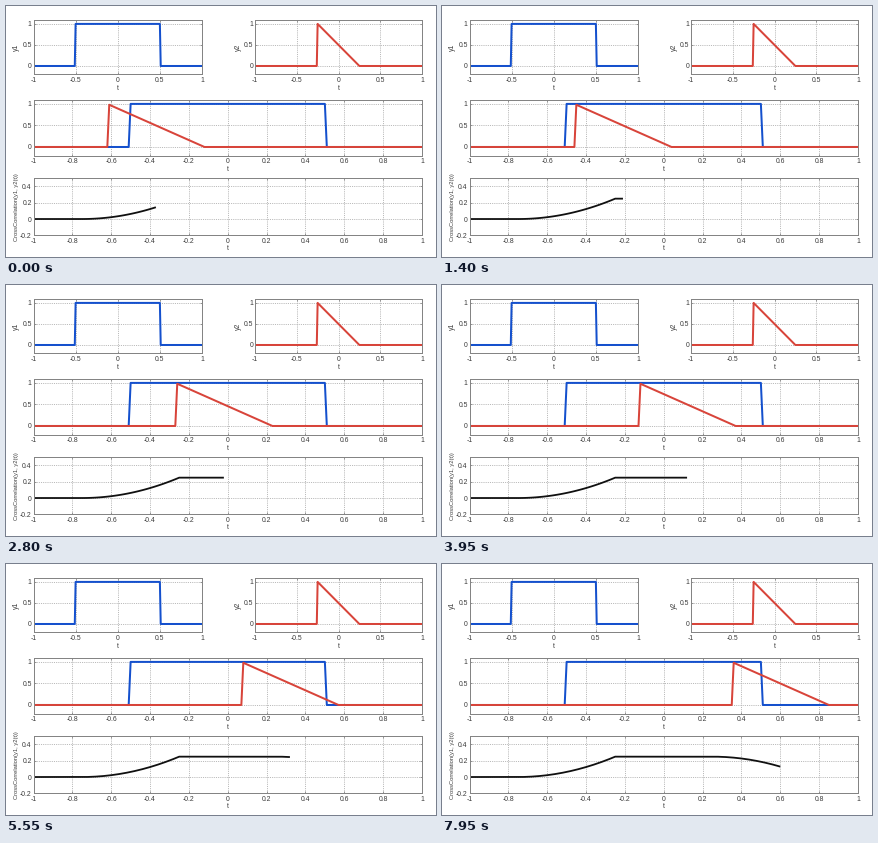
Write a matplotlib script that moves like this. It is 430 px wide and 251 px high and loops after 8 s.

```python
import numpy as np
import matplotlib.pyplot as plt
from matplotlib.animation import FuncAnimation

W, H, DPI = 430, 251, 128
PX = 72 / DPI  # points per pixel
BLUE, RED, BLACK = "#1450cd", "#d8443a", "#101010"
FRAME, GRID, TEXT = "#848484", "#b4b4b4", "#3c3c3c"
FRAMES, INTERVAL = 160, 50

plt.rcParams["font.family"] = "Liberation Sans"
fig = plt.figure(figsize=(W / DPI, H / DPI), dpi=DPI, facecolor="white")


def label(x, y, s, size=6.9, **kw):
    kw = {"ha": "center", "va": "center", **kw}
    fig.text(x / W, 1 - y / H, s, color=TEXT, fontsize=size * PX, **kw)


def panel(box, ylim, xticks, yticks, name="", size=6.9):
    """Axes with a pixel box (left, top, right, bottom), grid and labels."""
    left, top, right, bottom = box
    ax = fig.add_axes([left / W, 1 - bottom / H,
                       (right - left) / W, (bottom - top) / H])
    ax.set(xlim=(-1, 1), ylim=ylim, xticks=xticks, yticks=yticks)
    ax.set_axisbelow(True)
    ax.tick_params(direction="in", top=True, right=True, length=2 * PX,
                   width=0.8 * PX, color=FRAME,
                   labelbottom=False, labelleft=False)
    ax.grid(color=GRID, lw=0.9 * PX, ls=(0, (1.2, 1.2)))
    for spine in ax.spines.values():
        spine.set(color=FRAME, linewidth=PX)
    for v in xticks:
        label(left + (v + 1) / 2 * (right - left), bottom + 5.8, f"{v:g}")
    for v in yticks:
        y = bottom - (v - ylim[0]) / (ylim[1] - ylim[0]) * (bottom - top)
        label(left - 1.8, y, f"{v:g}", ha="right", va="center_baseline")
    label((left + right) / 2, bottom + 13.7, "t")
    if name:
        label(left - 17, (top + bottom) / 2, name, size, rotation=90)
    return ax


def draw(ax, x, y, color, width=2.0):
    return ax.plot(x, y, color=color, lw=width * PX,
                   solid_joinstyle="round", solid_capstyle="butt")[0]


def pulse(k):
    return (np.abs(k) <= 50).astype(float)


def ramp(k, first=-25):
    return np.where((k >= first) & (k <= 25), (25 - k) / 50, 0.0)


def overlap(t):
    """Area of the shifted ramp lying inside the pulse."""
    def part(u):
        u = np.clip(u, 0, 0.5)
        return u - u * u
    start = t - 0.25
    return part(0.5 - start) - part(-0.5 - start)


k = np.arange(-100, 101)
t = k / 100
coarse = [-1, -0.5, 0, 0.5, 1]
fine = [round(0.2 * i, 1) for i in range(-5, 6)]
unit = [0, 0.5, 1]

top_left = panel((27.5, 13.7, 196, 68.4), (-0.2, 1.1), coarse, unit, "y1")
top_right = panel((249, 13.7, 416, 68.4), (-0.2, 1.1), coarse, unit, "y2")
middle = panel((27.5, 93.6, 416, 149.6), (-0.2, 1.1), fine, unit)
bottom = panel((27.5, 172.3, 416, 229.3), (-0.2, 0.5), fine,
               [-0.2, 0, 0.2, 0.4], "CrossCorrelation(y1, y2(t))", 5.8)

draw(top_left, t, pulse(k), BLUE)
draw(top_right, t, ramp(k), RED)
draw(middle, t, pulse(k), BLUE)
moving = draw(middle, t, ramp(k), RED)
curve = draw(bottom, [], [], BLACK, 1.8)

# The sweep runs at a slightly uneven pace.
KEYS = [0, 28, 56, 79, 111, 135, 159]
SHIFTS = [-37, -21, -2, 12, 32, 46, 60]


def update(i):
    shift = int(np.floor(np.interp(i, KEYS, SHIFTS) + 0.5))
    moving.set_ydata(ramp(k - shift, first=-24))
    done = t[k <= shift]
    curve.set_data(done, overlap(done))
    return moving, curve


anim = FuncAnimation(fig, update, frames=FRAMES, interval=INTERVAL,
                     init_func=lambda: update(0), repeat=True,
                     repeat_delay=0, blit=False)
plt.show()
```
